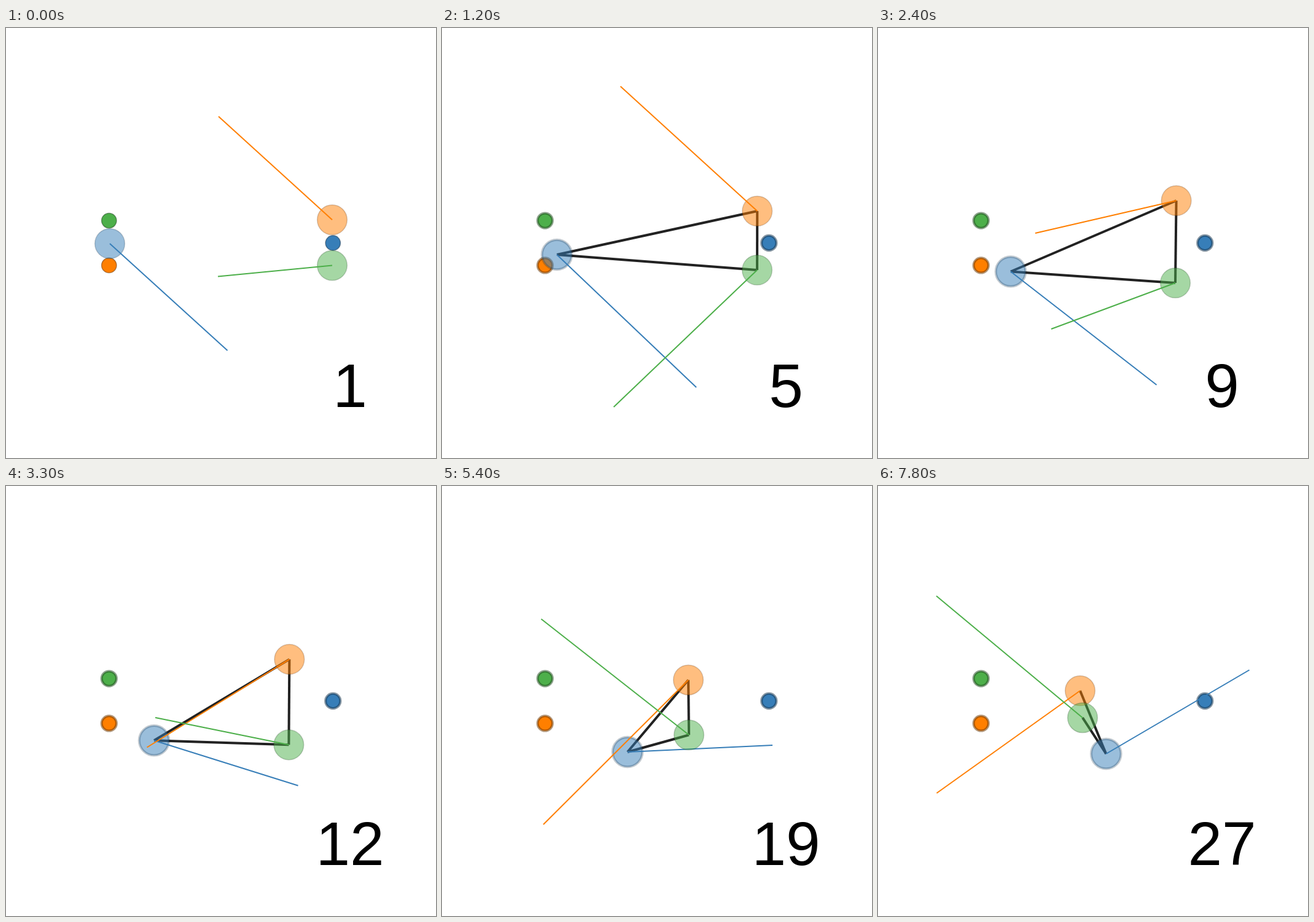
These frames come from a looping animation (700 by 700 pixels, 8000 ms). An HTML page with a canvas:

```html
<!DOCTYPE html>
<html>
<head>
<meta charset="utf-8">
<style>
  html, body { margin: 0; width: 100%; height: 100%; overflow: hidden; background: #fff; }
  canvas { display: block; }
</style>
</head>
<body>
<canvas id="stage" width="700" height="700"></canvas>
<script>
const ctx = document.getElementById('stage').getContext('2d');
const LOOP = 8000, STEP = 300, UNIT = 12.15;
const keys = [0, 4, 8, 14, 18, 22, 26];

// Each agent: colour, goal, centre path (x, y) and tip path (tx, ty) at the key steps
const agents = [
  { rgb: [55, 126, 184], goal: [15, 0],
    x: [169, 187, 216, 267, 302, 337, 371.3],
    y: [351, 369, 396.5, 428.5, 433, 432, 436],
    tx: [360.5, 414, 453.5, 497.5, 538, 577, 604.5],
    ty: [525, 585, 581, 394.5, 422, 296, 299.5] },
  { rgb: [255, 127, 0], goal: [-15, 3],
    x: [531, 513.2, 485.6, 436, 401, 365.8, 329],
    y: [312.3, 298, 281, 289.7, 315.7, 345, 333.3],
    tx: [346, 290.5, 256, 203, 165, 124.5, 95.5],
    ty: [144, 95, 334, 517, 551, 548.5, 500] },
  { rgb: [77, 175, 74], goal: [-15, -3],
    x: [531, 513, 484, 436, 402, 366.7, 333],
    y: [386.5, 394, 415, 422, 405.3, 382.5, 377.2],
    tx: [345, 279.5, 282, 204, 161.5, 128, 95],
    ty: [404.5, 617, 490, 264, 216.5, 196.5, 179] }
];

const css = (rgb, shade = 1) => `rgb(${rgb.map(c => c * shade).join()})`;

function segment(step) {
  let i = 0;
  while (i < keys.length - 2 && step >= keys[i + 1]) i++;
  const span = keys[i + 1] - keys[i];
  return { i, span, u: (step - keys[i]) / span };
}

function linear(v, step) {
  const { i, u } = segment(step);
  return v[i] + (v[i + 1] - v[i]) * u;
}

function smooth(v, step) {
  const { i, span, u } = segment(step);
  const slope = k => {
    const a = Math.max(k - 1, 0), b = Math.min(k + 1, keys.length - 1);
    return (v[b] - v[a]) / (keys[b] - keys[a]) * span;
  };
  const w = 1 - u;
  return v[i] * w * w * (1 + 2 * u) + v[i + 1] * u * u * (3 - 2 * u)
    + slope(i) * u * w * w - slope(i + 1) * u * u * w;
}

function line(x1, y1, x2, y2, color, width) {
  ctx.strokeStyle = color;
  ctx.lineWidth = width;
  ctx.beginPath();
  ctx.moveTo(x1, y1);
  ctx.lineTo(x2, y2);
  ctx.stroke();
}

function disc(x, y, r, rgb, alpha, rim) {
  ctx.beginPath();
  ctx.arc(x, y, r, 0, 2 * Math.PI);
  ctx.globalAlpha = alpha;
  ctx.fillStyle = css(rgb);
  ctx.fill();
  ctx.globalAlpha = alpha / 2;
  ctx.strokeStyle = css(rgb, 0.4);
  ctx.lineWidth = rim;
  ctx.stroke();
  ctx.globalAlpha = 1;
}

function draw(step) {
  ctx.clearRect(0, 0, 700, 700);
  const spots = agents.map(a => [smooth(a.x, step), smooth(a.y, step)]);
  const linked = step > 0;

  if (linked) {
    const pairs = [[0, 1], [0, 2]];
    if (step < 24) pairs.push([1, 2]);
    for (const [a, b] of pairs) line(...spots[a], ...spots[b], '#222', 4);
  }

  for (const { rgb, goal: [gx, gy] } of agents)
    disc(350 + gx * UNIT, 350 + gy * UNIT, UNIT, rgb, 1, linked ? 4 : 1.5);

  agents.forEach((a, i) => {
    disc(...spots[i], 2 * UNIT, a.rgb, 0.5, linked && i === 0 ? 4 : 1.5);
    line(...spots[i], linear(a.tx, step), linear(a.ty, step), css(a.rgb), 2);
  });

  ctx.fillStyle = '#000';
  ctx.font = '100px Arial, "Liberation Sans", sans-serif';
  ctx.textAlign = 'center';
  ctx.fillText(step + 1, 560, 617);
}

const start = performance.now();
function tick() {
  draw(Math.floor((performance.now() - start) % LOOP / STEP));
  requestAnimationFrame(tick);
}
tick();
</script>
</body>
</html>
```
